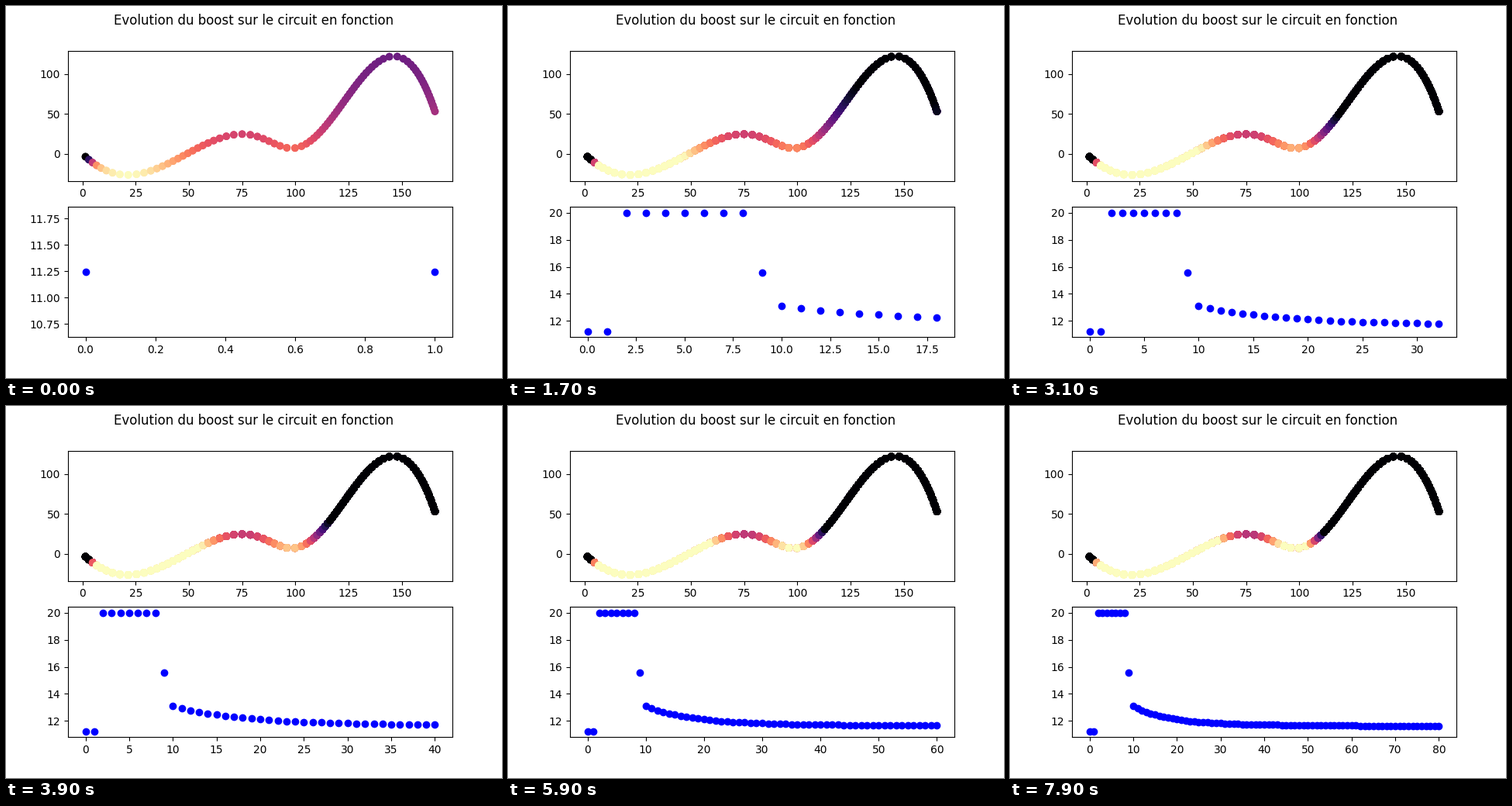
A matplotlib script for the animation above (8000 ms loop, 640 by 480 pixels).

```python
import numpy as np
import matplotlib.pyplot as plt
from matplotlib.animation import FuncAnimation

FRAMES, INTERVAL = 80, 100
DOTS = 87

# Track key points: x, height, slope, curvature
KEYS = np.array([
    [1.39, -3.8, -2.45, .144],
    [21.2, -26.7, 0, .1],
    [75.0, 24.6, 0, -.11],
    [98.3, 6.8, 0, .25],
    [146.2, 122.5, 0, -.29],
    [165.6, 53.2, -8.0, -.55],
])


def track(x):
    """Quintic Hermite curve through the key points."""
    i = np.clip(np.searchsorted(KEYS[:, 0], x, side="right") - 1, 0, len(KEYS) - 2)
    x0, y0, m0, k0 = KEYS[i].T
    x1, y1, m1, k1 = KEYS[i + 1].T
    h = x1 - x0
    u = (x - x0) / h
    m0, m1, k0, k1 = m0 * h, m1 * h, k0 * h * h, k1 * h * h
    d, e, g = y1 - y0 - m0 - k0 / 2, m1 - m0 - k0, k1 - k0
    return (y0 + m0 * u + k0 * u**2 / 2 + (10 * d - 4 * e + g / 2) * u**3
            + (7 * e - 15 * d - g) * u**4 + (6 * d - 3 * e + g / 2) * u**5)


def track_points():
    """Dots evenly spaced along the curve between a few stops."""
    x = np.linspace(KEYS[0, 0], KEYS[-1, 0], 6000)
    arc = np.r_[0, np.cumsum(np.hypot(np.diff(x), np.diff(track(x))))]
    stops = np.interp([x[0], 75, 99.85, 147.9, x[-1]], x, arc)
    s = np.interp(np.arange(DOTS), [0, 27, 35, 68, DOTS - 1], stops)
    px = np.interp(s, arc, x)
    return np.column_stack([px, track(px)])


def boost(step):
    """Low ground gets more boost, and the contrast grows with each step."""
    n = np.arange(DOTS)
    first = (.26 + .47 * np.exp(-points[:, 1] / 60)) * (1 - np.exp(-(n / 2) ** 2))
    last = 8.5 * first - .03 * n - 3.55
    w = (step / (FRAMES - 1)) ** 1.25
    return np.clip(first + w * (last - first), 0, 1)


def cost(n):
    """Flat start, a plateau, then a slow decay."""
    if n < 2:
        return 11.243
    if n < 9:
        return 20
    if n == 9:
        return 15.57
    return 11.6 + 1.2 * np.exp((10 - n) / 7.3) + .3 * np.exp((10 - n) / 28)


points = track_points()
steps = np.arange(FRAMES + 1)
costs = np.array([cost(n) for n in steps])
# The first state is drawn twice, then one layer is added per step
layers = np.array([boost(max(n - 1, 0)) for n in steps])

fig, (top, bottom) = plt.subplots(2, 1, figsize=(6.4, 4.8), dpi=100)
fig.suptitle("Evolution du boost sur le circuit en fonction")
dots = top.scatter(*points.T, c=layers[0], cmap="magma", vmin=0, vmax=1)
top.set_xlim(top.get_xlim())
top.set_ylim(top.get_ylim())
line, = bottom.plot(steps[:2], costs[:2], "bo")


def update(k):
    n = k + 2
    dots.set_offsets(np.tile(points, (n, 1)))
    dots.set_array(layers[:n].ravel())
    line.set_data(steps[:n], costs[:n])
    bottom.relim()
    bottom.autoscale_view()
    return dots, line


anim = FuncAnimation(fig, update, frames=FRAMES, init_func=lambda: update(0),
                     interval=INTERVAL, repeat=True, repeat_delay=0, blit=False)
plt.show()
```
